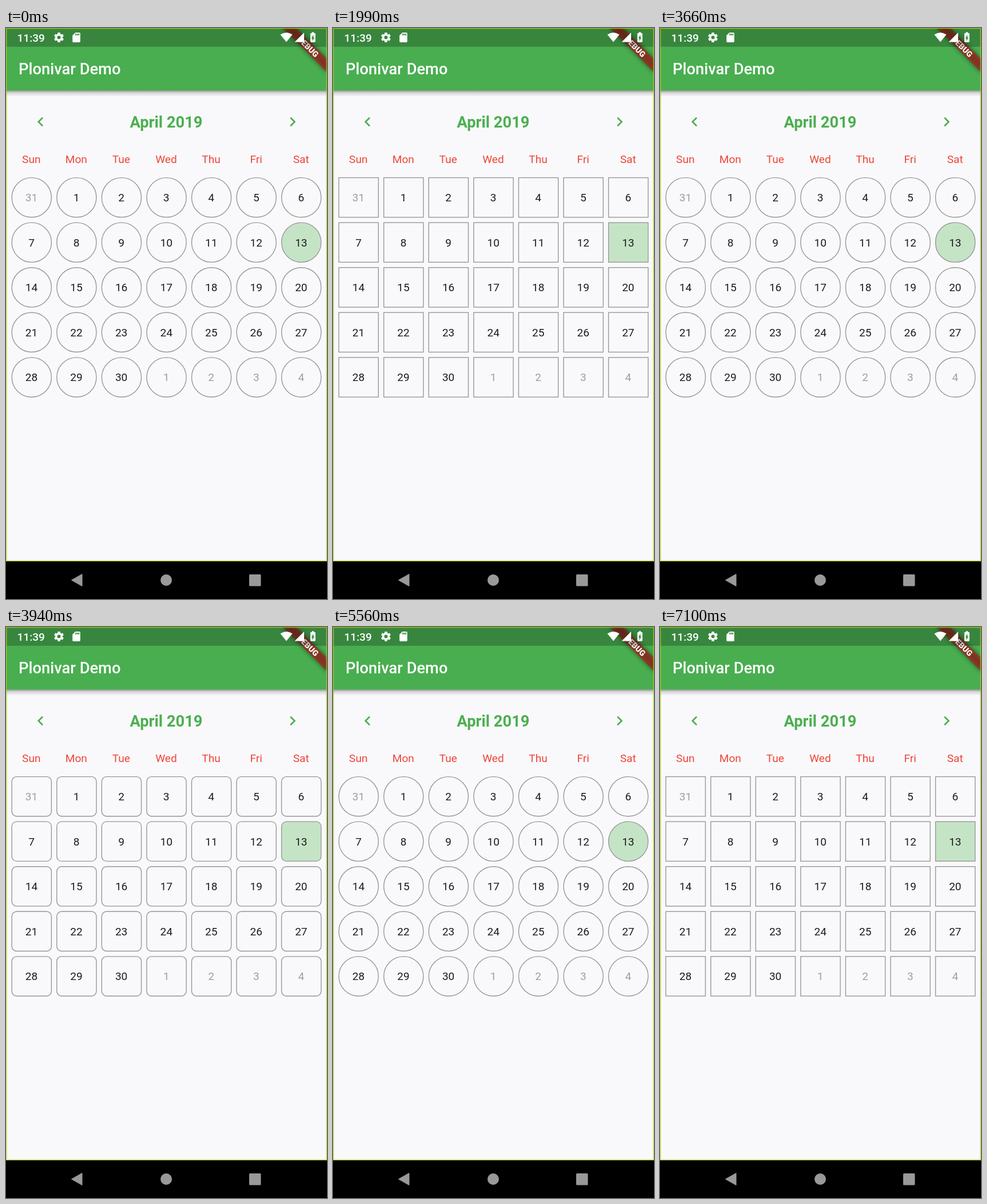
Animation, 561 px wide and 998 px high, one loop 7.35 s. Source, as an HTML page:

```html
<!DOCTYPE html>
<html lang="en">
<head>
<meta charset="utf-8">
<title>Calendar</title>
<style>
  html, body { margin: 0; width: 100%; height: 100%; overflow: hidden; background: #fafafa; }
  svg { display: block; width: 100vw; height: 100vh; }
  text { font: 19.1px Roboto, sans-serif; }
  .mid { text-anchor: middle; }
  .title { font-size: 27.3px; font-weight: 500; }
  .month { font-size: 27.3px; font-weight: 700; }
  .cell { fill: none; stroke: #969696; stroke-width: 1.37; }
  .today { fill: #c5e4c6; }
</style>
</head>
<body>
<svg viewBox="0 0 561 998">
  <defs>
    <linearGradient id="shade" x2="0" y2="1">
      <stop offset="0" stop-opacity=".4"/>
      <stop offset=".4" stop-opacity=".14"/>
      <stop offset="1" stop-opacity="0"/>
    </linearGradient>
    <filter id="blur" x="-20%" y="-80%" width="140%" height="260%">
      <feGaussianBlur stdDeviation="4"/>
    </filter>
  </defs>
  <rect width="561" height="998" fill="#f9f9fb"/>
  <rect y="109" width="561" height="11" fill="url(#shade)"/>
  <rect width="561" height="109.3" fill="#49ae50"/>
  <text class="title" x="22" y="81" fill="#fff">Plonivar Demo</text>

  <g transform="translate(561 0) rotate(45)">
    <rect x="-54.6" y="38.2" width="109.2" height="16.4" opacity=".5" filter="url(#blur)"/>
    <rect x="-54.6" y="38.2" width="109.2" height="16.4" fill="#b71c1c" fill-opacity=".63"/>
    <text class="mid" y="51.4" fill="#fff" style="font-size:13.9px;font-weight:900">DEBUG</text>
  </g>

  <rect width="561" height="32.8" fill-opacity=".23"/>
  <g fill="#fff" fill-rule="evenodd">
    <text x="19.5" y="24.2" font-weight="500" style="font-weight:500">11:39</text>
    <path transform="translate(82.3 6.3) scale(.85)" d="M19.43 12.98c.04-.32.07-.64.07-.98s-.03-.66-.07-.98l2.11-1.65c.19-.15.24-.42.12-.64l-2-3.46c-.12-.22-.39-.3-.61-.22l-2.49 1c-.52-.4-1.08-.73-1.69-.98l-.38-2.65C14.46 2.18 14.25 2 14 2h-4c-.25 0-.46.18-.49.42l-.38 2.65c-.61.25-1.17.59-1.69.98l-2.49-1c-.23-.09-.49 0-.61.22l-2 3.46c-.13.22-.07.49.12.64l2.11 1.65c-.04.32-.07.65-.07.98s.03.66.07.98l-2.11 1.65c-.19.15-.24.42-.12.64l2 3.46c.12.22.39.3.61.22l2.49-1c.52.4 1.08.73 1.69.98l.38 2.65c.03.24.24.42.49.42h4c.25 0 .46-.18.49-.42l.38-2.65c.61-.25 1.17-.59 1.69-.98l2.49 1c.23.09.49 0 .61-.22l2-3.46c.12-.22.07-.49-.12-.64zM12 15.5a3.5 3.5 0 1 1 0-7 3.5 3.5 0 0 1 0 7z"/>
    <path transform="translate(112.8 6.3) scale(.85)" d="M18 2h-8L4 8v12c0 1.1.9 2 2 2h12c1.1 0 2-.9 2-2V4c0-1.1-.9-2-2-2zm-6 6h-2V4h2zm3 0h-2V4h2zm3 0h-2V4h2z"/>
    <path d="M490 24.5 479.5 11.5Q490 4.500 500.500 11.500Z"/>
    <path d="M504.500 24.500H521V8Z"/>
    <path transform="translate(525.8 5.4) scale(.88)" d="M15.67 4H14V2h-4v2H8.330C7.600 4 7 4.600 7 5.330v15.330C7 21.400 7.600 22 8.330 22h7.330c.74 0 1.340-.6 1.340-1.330V5.330C17 4.600 16.400 4 15.670 4zM11 20v-5.500H9L13 7v5.500h2z"/>
  </g>

  <g fill="#4caf50">
    <path transform="translate(44 147.6) scale(1.365)" d="M15.41 7.41 14 6l-6 6 6 6 1.41-1.41L10.83 12z"/>
    <path transform="translate(484.5 147.6) scale(1.365)" d="M10 6 8.59 7.41 13.17 12l-4.58 4.59L10 18l6-6z"/>
    <text class="mid month" x="280" y="174">April 2019</text>
  </g>
  <g id="grid"></g>

  <rect y="932" width="561" height="66"/>
  <g fill="#999">
    <path d="M114.500 965 133 954.500V975.500Z" stroke="#999" stroke-linejoin="round"/>
    <circle cx="280" cy="965" r="10"/>
    <rect x="425" y="955" width="20.500" height="20.500" rx="1.500"/>
  </g>
  <rect x=".75" y=".75" width="559.5" height="930.7" fill="none" stroke="#a4d010" stroke-opacity=".75" stroke-width="1.5"/>
</svg>
<script>
const LOOP = 7350, PITCH = 78.56, SIDE = 69.2;
const grid = document.getElementById('grid');
const cells = [];

function add(tag, attrs, text = '') {
  const el = document.createElementNS('http://www.w3.org/2000/svg', tag);
  for (const key in attrs) el.setAttribute(key, attrs[key]);
  el.textContent = text;
  grid.append(el);
  return el;
}

const centre = col => 44.8 + col * PITCH;

['Sun', 'Mon', 'Tue', 'Wed', 'Thu', 'Fri', 'Sat'].forEach((name, col) =>
  add('text', { class: 'mid', x: centre(col) - .5, y: 236, fill: '#f04438' }, name));

for (let i = 0; i < 35; i++) {
  const x = centre(i % 7), y = 296.2 + Math.floor(i / 7) * PITCH;
  const inMonth = i > 0 && i < 31;
  const day = i === 0 ? 31 : inMonth ? i : i - 30;
  cells.push(add('rect', {
    class: i === 13 ? 'cell today' : 'cell',
    x: x - SIDE / 2, y: y - SIDE / 2, width: SIDE, height: SIDE
  }));
  add('text', { class: 'mid', x: x - .3, y: y + 6.9, fill: inMonth ? '#1c1c1c' : '#9e9e9e' }, day);
}

// Each morph: start, end, roundness reached (1 = circle, 0 = square)
const morphs = [[570, 975, 0], [2040, 2450, 1], [3650, 4035, 0], [5100, 5520, 1], [6685, 7095, 0]];

function roundness(t) {
  let value = 1;
  for (const [start, end, to] of morphs) {
    const p = Math.min(1, Math.max(0, (t - start) / (end - start)));
    value += (to - value) * p;
  }
  return value;
}

function draw() {
  const r = roundness(performance.now() % LOOP) * SIDE / 2;
  for (const cell of cells) cell.setAttribute('rx', r);
  requestAnimationFrame(draw);
}
draw();
</script>
</body>
</html>
```
